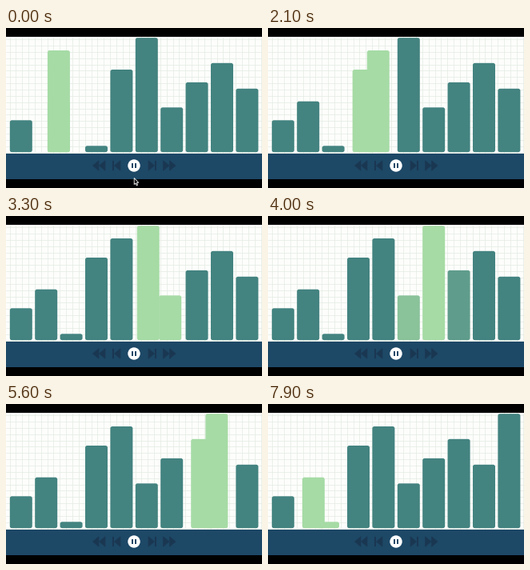
A matplotlib script that plays this animation: 320x200 px, repeating every 8 s.

```python
import matplotlib.pyplot as plt
import numpy as np
from matplotlib.animation import FuncAnimation
from matplotlib.patches import Circle, FancyBboxPatch, Polygon, Rectangle

W, H, DPI = 320, 200, 100
FRAMES, STEP = 80, 100
FLOOR, LEFT, PITCH, BAR_W, RADIUS = 155.2, 4.8, 31.4, 28, 2.6
TOPS = [115.3, 28, 91.7, 147.3, 52, 12.2, 99.3, 67.9, 43.8, 75.8]
DARK = np.array([67, 131, 128]) / 255
LIGHT = np.array([166, 219, 165]) / 255
NAVY, ICON = "#1d4866", "#1a3752"
FADE, DELAY, SWAP, HOLD = 350, 200, 800, 500
CURSOR_GONE = 1500

fig = plt.figure(figsize=(W / DPI, H / DPI), dpi=DPI, facecolor="black")
ax = fig.add_axes([0, 0, 1, 1])
ax.set(xlim=(0, W), ylim=(H, 0))
ax.axis("off")


def rect(x, y, w, h, color, z=1):
    ax.add_patch(Rectangle((x, y), w, h, fc=color, lw=0, zorder=z))


def triangle(x, size, z=3):
    """Triangle with its base at x, pointing along the sign of size."""
    pts = [(x, 165.8), (x, 178.2), (x + size, 172)]
    ax.add_patch(Polygon(pts, fc=ICON, ec=ICON, lw=0.4,
                         joinstyle="round", zorder=z))


def ease(u):
    u = min(max(u, 0), 1)
    return 4 * u ** 3 if u < 0.5 else 1 - 4 * (1 - u) ** 3


def ramp(t):
    return min(max(t / FADE, 0), 1)


def bubble_sort(start, first):
    """List comparisons as (time, end, left bar, right bar, swapped)."""
    order, steps = list(range(len(TOPS))), []
    t, i = start, first
    while t < FRAMES * STEP:
        a, b = order[i], order[i + 1]
        swapped = TOPS[a] < TOPS[b]
        end = t + (DELAY + SWAP if swapped else HOLD)
        steps.append((t, end, a, b, swapped))
        if swapped:
            order[i], order[i + 1] = b, a
        t, i = end, (i + 1) % (len(TOPS) - 1)
    return steps


# Paper, grid and control strip
rect(0, 10.5, W, 146.5, "#fdfefc")
grid = dict(color="#e3ebe2", lw=0.5, zorder=1.5)
for x in np.arange(4.5, W, 7.85):
    ax.plot([x, x], [10.5, 156.5], **grid)
for y in np.arange(155.5, 11, -7.85):
    ax.plot([0, W], [y, y], **grid)
rect(0, 157, W, 31.7, NAVY, 2)

for x in (116, 124):
    triangle(x, -7.5)
rect(133.4, 166, 2, 12, ICON, 3)
triangle(143, -7.5)
triangle(178, 7.5)
rect(185.6, 166, 2, 12, ICON, 3)
for x in (196.5, 204.5):
    triangle(x, 7.5)
ax.add_patch(Circle((160, 172), 7.7, fc="white", lw=0, zorder=3))
for x in (157.1, 160.9):
    rect(x, 168.8, 2, 6.4, NAVY, 4)

arrow = [(160.2, 187.5), (160.2, 195.6), (162, 194), (163.2, 196.8),
         (164.6, 196.2), (163.4, 193.5), (165.7, 193.3)]
cursor = ax.add_patch(Polygon(arrow, fc="black", ec="white", lw=0.6, zorder=5))

bars = []
for top in TOPS:
    bar = FancyBboxPatch((LEFT, top), BAR_W, FLOOR - top, lw=0, zorder=2.5,
                         boxstyle=f"round,pad=0,rounding_size={RADIUS}")
    bars.append(ax.add_patch(bar))

STEPS = bubble_sort(-600, 1)


def draw(frame):
    t = frame * STEP
    slot = np.arange(len(TOPS), dtype=float)
    glow = np.zeros(len(TOPS))
    for start, end, a, b, swapped in STEPS:
        glow[[a, b]] += ramp(t - start) - ramp(t - end)
        if swapped:
            move = ease((t - start - DELAY) / SWAP)
            slot[a] += move
            slot[b] -= move
    for bar, s, g in zip(bars, slot, glow):
        bar.set_x(LEFT + PITCH * s)
        bar.set_facecolor(np.clip(DARK + (LIGHT - DARK) * g, 0, 1))
    cursor.set_visible(t < CURSOR_GONE)
    return bars + [cursor]


anim = FuncAnimation(fig, draw, frames=FRAMES, interval=STEP,
                     repeat=True, repeat_delay=0, blit=False)
plt.show()
```
